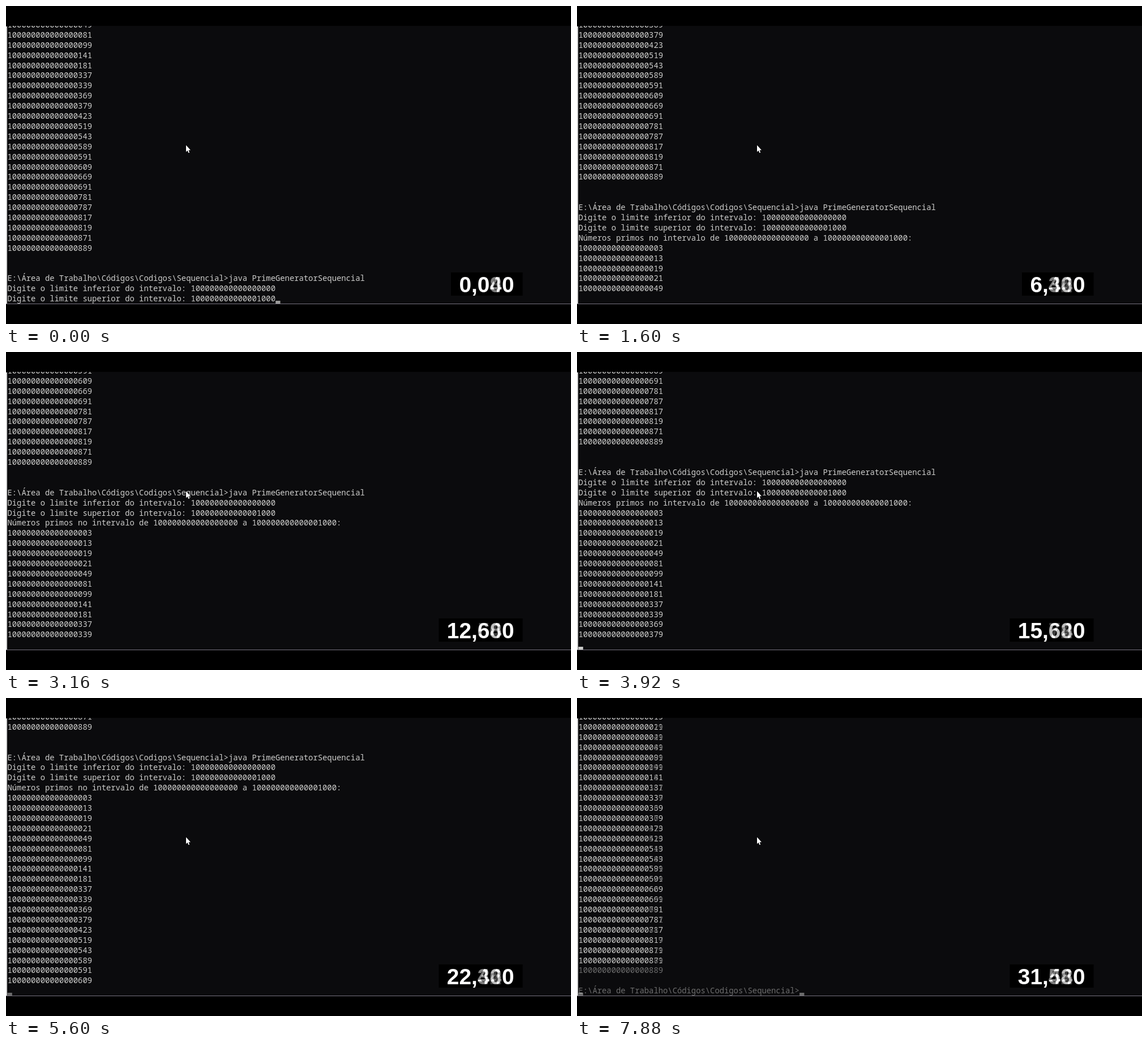
Animation of 998x561 px, one loop 7920 ms. Source, as an HTML page with a canvas:

```html
<!DOCTYPE html>
<html lang="pt">
<head>
<meta charset="utf-8">
<title>Gerador de primos</title>
<style>
html, body { margin: 0; width: 100%; height: 100%; overflow: hidden; background: #000; }
canvas { display: block; }
</style>
</head>
<body>
<canvas id="stage" width="998" height="561"></canvas>
<script>
const ctx = document.getElementById('stage').getContext('2d');

const LOOP = 7920, STEP = 40, SPEED = 4;
const PITCH = 17.9, CHAR = 8.31, LEFT = 2.5, LAST_ROW = 27;
const HEADER_AT = 100, PRIME_EVERY = 1127, DONE_AT = 31400, PROMPT_AT = 31520;

const big = tail => '1' + '0'.repeat(14) + tail;
const primes = ('003 013 019 021 049 081 099 141 181 337 339 369 379 423 519 543 589 591 ' +
  '609 669 691 781 787 817 819 871 889').split(' ').map(big);
const prompt = 'E:\\Área de Trabalho\\Códigos\\Codigos\\Sequencial>';
const low = big('000'), high = '100000000000001000';
const lines = [
  ...primes, '', '',
  prompt + 'java PrimeGeneratorSequencial',
  'Digite o limite inferior do intervalo: ' + low,
  'Digite o limite superior do intervalo: ' + high,
  `Números primos no intervalo de ${low} a ${high}:`,
  ...primes, '', '', prompt
];
const INPUT = primes.length + 4, FINAL = lines.length - 1;

// Index of the line that holds the cursor at clock time ms
function cursorLine(ms) {
  if (ms < HEADER_AT) return INPUT;
  if (ms >= PROMPT_AT) return FINAL;
  if (ms >= DONE_AT) return FINAL - 1;
  return INPUT + 2 + Math.min(primes.length, Math.floor(ms / PRIME_EVERY));
}

const cursorOn = ms => ms >= DONE_AT || Math.floor((ms - 20) / 545) % 2 === 0;

function drawConsole(ms) {
  const bottom = cursorLine(ms);
  const current = bottom === INPUT || bottom === FINAL ? lines[bottom] : '';
  ctx.font = '13.85px "Noto Sans Mono", "DejaVu Sans Mono", monospace';
  ctx.textAlign = 'left';
  ctx.fillStyle = '#c0c0bc';
  for (let row = 0; row <= LAST_ROW; row++) {
    const text = row === LAST_ROW ? current : lines[bottom - LAST_ROW + row];
    ctx.fillText(text, LEFT, 55.8 + (row - 1) * PITCH);
  }
  if (cursorOn(ms)) ctx.fillRect(LEFT + current.length * CHAR, 520, CHAR, 5);
}

function drawClock(ms) {
  ctx.font = 'bold 38.8px "Liberation Sans", Arial, sans-serif';
  ctx.textAlign = 'right';
  ctx.fillStyle = '#fff';
  ctx.fillText((ms / 1000).toFixed(3).replace('.', ','), 897.5, 505);
}

function drawPointer() {
  ctx.beginPath();
  [[0, 0], [0, 12], [2.6, 9.6], [4.4, 13.8], [6.2, 13], [4.5, 9], [8, 8.8]]
    .forEach(([x, y]) => ctx.lineTo(318 + x, 245.5 + y));
  ctx.closePath();
  ctx.lineWidth = 1;
  ctx.strokeStyle = '#000';
  ctx.stroke();
  ctx.fillStyle = '#fff';
  ctx.fill();
}

function rect(color, x, y, w, h) {
  ctx.fillStyle = color;
  ctx.fillRect(x, y, w, h);
}

function draw(time) {
  const clock = Math.floor(time % LOOP / STEP) * STEP * SPEED;
  rect('#000', 0, 0, 998, 561);
  rect('#0b0b0d', 0, 35, 998, 491);
  rect('#d4d4d4', 0, 36, 2, 489);
  rect('#77737f', 0, 525, 998, 1);
  const boxLeft = clock + STEP < 10000 ? 786 : 764.5;
  rect('#000', boxLeft, 470, 912.5 - boxLeft, 41);

  // Each picture is the mean of four moments of the sped-up recording
  ctx.save();
  ctx.beginPath();
  ctx.rect(0, 35, 998, 491);
  ctx.clip();
  ctx.globalCompositeOperation = 'lighter';
  ctx.globalAlpha = 0.25;
  for (const shift of [-80, -40, 0, 40]) {
    const ms = Math.abs(clock + shift);
    drawConsole(ms);
    drawClock(ms);
  }
  ctx.restore();
  drawPointer();
}

function tick() {
  draw(performance.now());
  requestAnimationFrame(tick);
}
tick();
</script>
</body>
</html>
```
